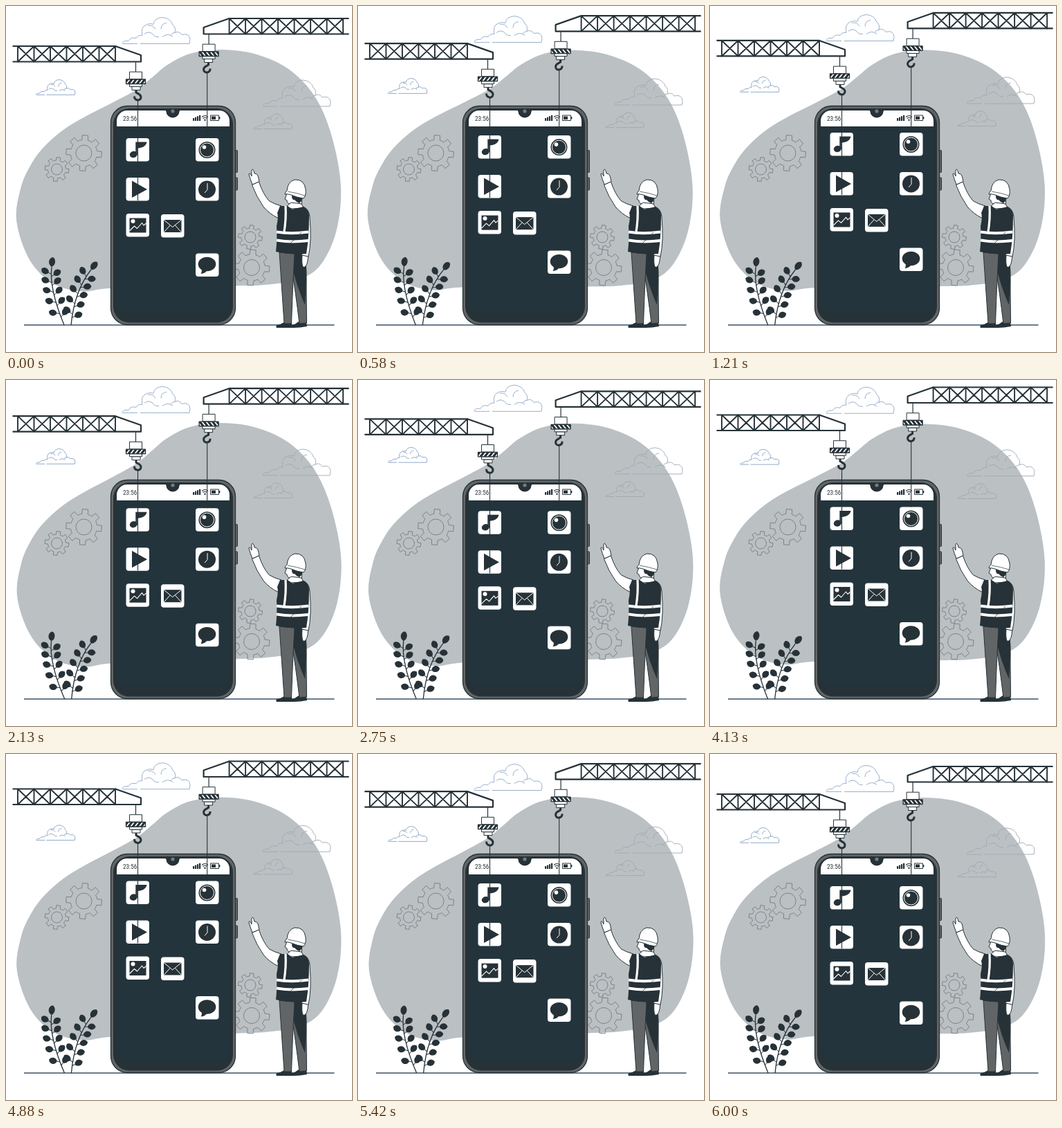
An HTML page with a canvas that plays this animation: 500x500 px, repeating every 6.04 s.

```html
<!DOCTYPE html>
<html lang="en">
<head>
<meta charset="utf-8">
<title>App building</title>
<style>
html, body { margin: 0; width: 100%; height: 100%; overflow: hidden; background: #fff; }
canvas { display: block; width: 500px; height: 500px; }
</style>
</head>
<body>
<canvas id="stage"></canvas>
<script>
const LOOP = 6040, FPS = 24;
const INK = '#263238', SCREEN = '#23343c', GREY = '#626566', WHITE = '#fff';
const canvas = document.getElementById('stage');
const ctx = canvas.getContext('2d');
const dpr = window.devicePixelRatio || 1;
canvas.width = canvas.height = 500 * dpr;

function fill(path, color) {
  ctx.fillStyle = color;
  ctx.fill(typeof path === 'string' ? new Path2D(path) : path);
}

function stroke(path, color = INK, width = 1) {
  ctx.strokeStyle = color;
  ctx.lineWidth = width;
  ctx.stroke(typeof path === 'string' ? new Path2D(path) : path);
}

function shape(path, color, line = INK, width = 1) {
  fill(path, color);
  stroke(path, line, width);
}

function box(x, y, w, h, r = 0) {
  const p = new Path2D();
  p.roundRect(x, y, w, h, r);
  return p;
}

function oval(x, y, rx, ry = rx, turn = 0) {
  const p = new Path2D();
  p.ellipse(x, y, rx, ry, turn, 0, Math.PI * 2);
  return p;
}

function at(x, y, draw) {
  ctx.save();
  ctx.translate(x, y);
  draw();
  ctx.restore();
}

function turned(x, y, degrees, draw) {
  ctx.save();
  ctx.translate(x, y);
  ctx.rotate(degrees * Math.PI / 180);
  ctx.translate(-x, -y);
  draw();
  ctx.restore();
}

// closed Catmull-Rom curve through the points
function smooth(pts) {
  const p = new Path2D(), n = pts.length;
  p.moveTo(...pts[0]);
  for (let i = 0; i < n; i++) {
    const a = pts[(i + n - 1) % n], b = pts[i], c = pts[(i + 1) % n], d = pts[(i + 2) % n];
    p.bezierCurveTo(b[0] + (c[0] - a[0]) / 6, b[1] + (c[1] - a[1]) / 6,
      c[0] - (d[0] - b[0]) / 6, c[1] - (d[1] - b[1]) / 6, c[0], c[1]);
  }
  p.closePath();
  return p;
}

const blob = smooth([[311, 63.5], [361, 70], [409, 92], [446, 131], [470, 187], [483.5, 260],
  [477, 325], [455, 373], [425, 394], [380, 402], [330, 404], [160, 407], [110, 412],
  [67, 400], [34, 366], [15.5, 310], [22, 262], [36, 230], [54, 205], [82, 180], [113, 161],
  [152, 141], [189, 121], [213, 102], [234, 85], [267, 69]]);

const cloudPath = new Path2D('M0 37 Q2 33 9 34 Q12 28 20 30 Q23 25 29 26 Q26 13 36 10 Q41 8 45 10' +
  'Q46 1 58 0 Q70 1 73 11 Q78 14 76 22 Q82 19 86 25 Q97 22 98 32 L97 38 H26 M22 38 H0' +
  'M37 12 Q44 10 48 17 M64 8 Q56 9 56 17 M32 24 q6 -5 12 0 q3 5 9 4 M58 28 q8 -6 15 0 M76 22 q-4 0 -6 4');

function cloud(x, y, scale, color) {
  at(x, y, () => {
    ctx.scale(scale, scale);
    stroke(cloudPath, color, 0.9 / scale);
  });
}

function gear(x, y, r, hole, turn) {
  const p = new Path2D(), step = Math.PI / 4;
  for (let i = 0; i < 8; i++) {
    const a = i * step + turn;
    for (const [k, d] of [[0.74, -0.23], [1, -0.16], [1, 0.16], [0.74, 0.23]])
      p.lineTo(x + r * k * Math.cos(a + d), y + r * k * Math.sin(a + d));
    p.arc(x, y, r * 0.74, a + 0.23, a + step - 0.23);
  }
  p.closePath();
  stroke(p, '#747c80', 0.9);
  stroke(oval(x, y, hole), '#747c80', 0.9);
}

function leaf(x, y, angle, len = 12) {
  at(x, y, () => {
    ctx.rotate(angle);
    fill(`M0 0 C${len * 0.2} -6.5 ${len * 0.85} -6.5 ${len} 0 C${len * 0.85} 5.5 ${len * 0.2} 5.5 0 0Z`, INK);
  });
}

function branch(x0, y0, cx, cy, x1, y1) {
  stroke(`M${x0} ${y0} Q${cx} ${cy} ${x1} ${y1}`, INK, 1.3);
  const mix = (a, b, c, t) => a * (1 - t) ** 2 + 2 * b * t * (1 - t) + c * t * t;
  const sprout = (t, spread) => {
    const a = spread + Math.atan2((1 - t) * (cy - y0) + t * (y1 - cy), (1 - t) * (cx - x0) + t * (x1 - cx));
    const x = mix(x0, cx, x1, t), y = mix(y0, cy, y1, t);
    const tipX = x + 4 * Math.cos(a), tipY = y + 4 * Math.sin(a);
    stroke(`M${x} ${y} L${tipX} ${tipY}`);
    leaf(tipX, tipY, a);
  };
  for (let i = 0; i < 5; i++) {
    sprout(0.16 + i * 0.17, -1.05);
    sprout(0.11 + i * 0.17, 1.05);
  }
  leaf(x1, y1, Math.atan2(y1 - cy, x1 - cx), 14);
}

function crane(cells, end) {
  const cell = 23.5, x0 = 158 - cells * cell;
  stroke(`M${end} 58 H158 L195 71 V80.5 H${end}`, INK, 2.2);
  let bars = '';
  for (let i = 0; i < cells; i++) {
    const a = x0 + i * cell, b = a + cell;
    bars += `M${a} 58 V80.5 L${b} 58 V80.5 L${a} 58`;
  }
  stroke(bars, INK, 1.9);
  stroke('M187.5 81 V95', INK, 1.2);
  shape(box(178.5, 95.2, 18, 10.5), WHITE);
  shape(box(182, 116.5, 12, 5), WHITE);
  shape(box(178.5, 112.5, 18, 4), WHITE);
  const bar = box(173.5, 106, 28, 6.5);
  fill(bar, WHITE);
  ctx.save();
  ctx.clip(bar);
  let stripes = '';
  for (let x = 170; x < 206; x += 6.2) stripes += `M${x} 113.5 l7 -9`;
  stroke(stripes, INK, 3.2);
  ctx.restore();
  stroke(bar, INK, 1.3);
  stroke('M188 121.5 V125 C191 127 195.5 128 195 132 C194.5 137.5 185.5 137.5 185.5 130.5', INK, 3);
}

const icons = [
  [173.5, 191, () => {
    fill(oval(10.8, 23.5, 5.6, 4.6, -0.3), INK);
    fill('M13.8 5.5 H30 C29 11.5 24 14 16.3 14.5 V24 H13.8Z', INK);
  }],
  [173.5, 248, () => fill('M8.5 4.5 L30.5 17 L8.5 29Z', INK)],
  [173.5, 300, () => {
    fill(box(5, 6.5, 24, 21), INK);
    fill(oval(10, 11, 3), WHITE);
    stroke('M5 25 L12 18 L16 21.5 L23 13.5 L25.5 17 L29 14', WHITE, 1.1);
  }],
  [224, 301, () => {
    fill(box(4, 8, 25.5, 18), INK);
    stroke('M4 8 L16.7 18.5 L29.5 8 M4 26 L13 16 M29.5 26 L20.5 16', WHITE, 1);
  }],
  [274, 191, () => {
    fill(oval(16.5, 17, 12), INK);
    stroke(oval(16.5, 17, 10), WHITE, 1);
    fill(oval(12.5, 13, 2.8), WHITE);
  }],
  [274, 248, () => {
    fill(oval(16.5, 17, 12.5), INK);
    stroke('M17 8 V17.5 L13 22', WHITE, 1);
  }],
  [274, 357.5, () => {
    fill(oval(16.5, 15.5, 12.8, 10.2), INK);
    fill('M8 21 Q10 26 7.5 29.5 Q14 29 17 24Z', INK);
  }]
];

// largest size up to the given one at which the text fits
function fitText(text, x, y, width, size) {
  const font = s => `${s}px "Roboto Condensed", Roboto, sans-serif`;
  ctx.font = font(size);
  ctx.font = font(size * Math.min(1, width / ctx.measureText(text).width));
  ctx.fillText(text, x, y);
}

function phone() {
  shape(box(329, 208.5, 5.5, 32, 1), GREY);
  shape(box(329, 248, 5.5, 18, 1), GREY);
  shape(box(151.5, 144.5, 180, 316, 24), GREY, INK, 1.3);
  fill(box(155, 148, 173, 309.5, 23), INK);
  fill(box(160, 151, 163, 292, 15), SCREEN);
  fill(box(160, 151, 163, 22.9, [15, 15, 0, 0]), WHITE);
  fill('M228 149 Q231 150 231.5 152.5 A9.5 9 0 0 0 250.5 152.5 Q251 150 254 149Z', INK);
  fill(oval(241, 152, 2.6), '#737b7f');
  ctx.fillStyle = INK;
  fitText('23:56', 169, 165.8, 20.3, 10);
  for (let i = 0; i < 4; i++) fill(box(270 + i * 3, 162 - i * 1.4, 2.2, 4 + i * 1.4), INK);
  stroke('M283 160.5 Q287.5 156.5 292 160.5 M284.6 162.6 Q287.5 160 290.4 162.6', INK, 1.1);
  fill(oval(287.5, 164.8, 1.2), INK);
  stroke(box(295.5, 158, 12, 7.5), INK, 1);
  fill(box(297, 159.5, 6, 4.5), INK);
  fill(box(308, 160.3, 1.4, 3), INK);
}

function man() {
  // shoes and trousers
  fill('M402 457 L413 457 L413 465 L391 465 Q388 461 396 460Z', INK);
  fill('M423 456 L434 456 L435 463 Q420 466 408 464.5 Q408 461 417 460Z', INK);
  shape('M412 357 L432 357 Q435 385 434 410 L434.5 458 L424 459 Q418 410 413 380Z', GREY);
  fill('M414 358 L432 358 Q435 385 433.5 410 L432 432 Q420 405 414 378Z', INK);
  shape('M395 356 L417 358 Q414 410 412.5 459 L402 459 Q398 400 395 356Z', GREY);
  // lowered arm
  shape('M428 360 Q427 372 429 377 Q434 379 436 368 L437 360Z', WHITE);
  shape('M429 290 Q438 293 439 305 Q442 340 437 362 L427 360 Q431 345 431 325Z', WHITE);
  // raised hand and sleeve
  shape('M356 258 L353 250 L351 243 Q352 240 354 244 L355 246 L355 238 Q356 234 358 238' +
    'L359 242 Q364 242 365 249 L366 254Z', WHITE);
  shape('M355.5 258.5 L365.5 254 Q371 271 380 281.5 Q387 286 398 289 L394 307 Q380 300 372 290 Q362 276 355.5 258.5Z', WHITE);
  // neck and face
  shape('M406 271 L403 279 L406 281 Q406 286 412 286 L411 291 L427 291 L428 272Z', WHITE);
  fill('M413 274 L429 275 Q428 282 424 285 Q419 283 417 280 Q413 281 413 274Z', INK);
  shape('M405 290 L412 284 L427 286 L430 292 L412 293Z', WHITE);
  // vest
  fill('M396 289 L407 289 L414 294 L430 290 Q438 294 438 303 Q438 335 434 358 Q410 360 390 355' +
    'Q392 338 391 318 Q394 305 392 299Z', INK);
  ctx.save();
  ctx.clip(box(391, 288, 46, 58));
  stroke('M404 289 Q405 308 402 326', WHITE, 3.2);
  stroke('M391 326.5 Q412 330 437 326.5 M391 338.5 Q412 342 437 339', WHITE, 4);
  ctx.restore();
  stroke('M410 344 L427 327', INK, 0.7);
  // helmet
  shape('M403 272 Q403 269 406 267 Q407 254 417 251 Q431 250 433 265 Q434 274 430 278 Q421 277 412 273 Q406 271 403 272Z', WHITE);
  stroke('M407 268 Q420 270 432 274', INK, 0.7);
}

// linear there-and-back, 0..1..0
const bounce = p => 1 - Math.abs(1 - 2 * p);
// linear swing 0, 1, -1, 0 with peaks at one and three quarters
const swing = p => p < 0.25 ? 4 * p : p < 0.75 ? 2 - 4 * p : 4 * p - 4;

function render(time) {
  const sec = Math.floor((time % LOOP + 5) * FPS / 1000) / FPS;
  const fast = (sec / 3) % 1, slow = (sec / 6) % 1;
  const lift = -10 * bounce(fast), drift = -10 * bounce(slow), sway = swing(fast);

  ctx.setTransform(dpr, 0, 0, dpr, 0, 0);
  ctx.fillStyle = WHITE;
  ctx.fillRect(0, 0, 500, 500);
  ctx.lineJoin = 'round';

  turned(249.5, 238, sway, () => shape(blob, '#bbc0c2', '#a9b7c6', 0.6));
  at(0, drift, () => {
    cloud(168, 16.5, 1, '#8ea8c8');
    cloud(43.5, 106.5, 0.575, '#86a2c2');
    cloud(371, 107, 1, '#a1a9b0');
    cloud(357.5, 156, 0.57, '#a1a8ac');
  });
  gear(112.5, 212.5, 26, 11.5, 0.08);
  gear(73.5, 236, 17.5, 8, 0.14);
  gear(353, 334, 17.5, 8, 0.14);
  gear(355, 378, 26, 11.5, 0.08);

  stroke('M26 461 H474.5', '#3b5064', 1.4);
  turned(90, 412, sway, () => {
    branch(84, 461, 62, 408, 66, 377);
    branch(94, 461, 99, 411, 123, 381);
  });
  phone();

  at(0, lift, () => {
    for (const [x, y, draw] of icons) at(x, y, () => {
      fill(box(0, 0, 33.5, 33.5, 4), WHITE);
      draw();
    });
    stroke('M190.5 136 V281 M290.7 96 V191', INK, 1.1);
    crane(6, 9.5);
    at(480.6, -40, () => {
      ctx.scale(-1, 1);
      crane(7, -15);
    });
  });
  man();
}

const start = performance.now();
function tick() {
  render(performance.now() - start);
  requestAnimationFrame(tick);
}
tick();
</script>
</body>
</html>
```
